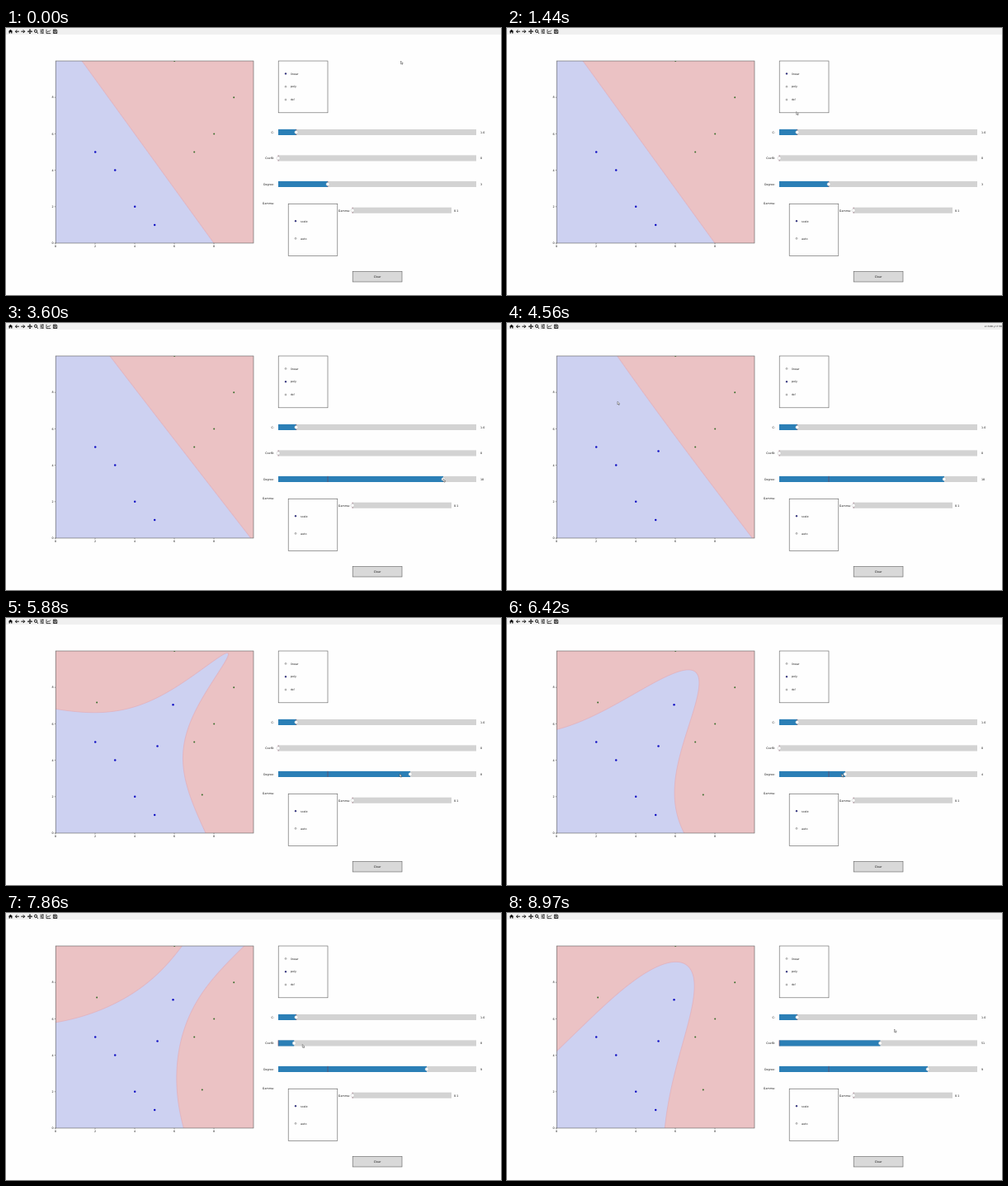
An HTML page with a canvas that plays this animation: 600x324 px, repeating every 9 s.

```html
<!DOCTYPE html>
<html lang="en">
<head>
<meta charset="utf-8">
<title>SVM kernel explorer</title>
<style>
  html, body { margin: 0; width: 100%; height: 100%; overflow: hidden; background: #fefefe; }
  canvas, svg { position: absolute; left: 0; top: 0; }
  canvas { left: 60px; top: 40px; }
  text { font: 3.3px "DejaVu Sans", sans-serif; fill: #111; text-rendering: geometricPrecision; }
  .end { text-anchor: end; }
  .mid { text-anchor: middle; }
  .frame { fill: none; stroke: #5c5c5c; stroke-width: .6; }
  .icon { fill: none; stroke: #111; stroke-width: 1; }
  .fine { stroke-width: .75; }
  .solid { fill: #111; stroke: none; }
</style>
</head>
<body>
<canvas id="plot" width="240" height="221"></canvas>
<svg id="ui" width="600" height="324" viewBox="0 0 600 324">
  <rect width="600" height="8" fill="#f0f0f0"/>
  <g class="icon">
    <path class="solid" d="M2.8 4.3 5.5 1.7 8.2 4.3H7.4V6.6H6.1V4.9H4.9V6.6H3.6V4.3Z"/>
    <path d="M15.8 4.2H11.5M13.3 2.3 11.4 4.2 13.3 6.1"/>
    <path d="M18.3 4.2H22.6M20.8 2.3 22.7 4.2 20.8 6.1"/>
    <path d="M26.7 4.2H31.3M29 1.9V6.5"/>
    <path class="solid" d="M29 1.2 30.2 2.5H27.8ZM29 7.2 30.2 5.9H27.8ZM26 4.2 27.3 3V5.4ZM32 4.2 30.7 3V5.4Z"/>
    <circle cx="36" cy="3.7" r="1.6"/><path d="M37.2 4.9 39 6.7"/>
    <path class="fine" d="M41.5 2.3H46M41.5 4.2H46M41.5 6.1H46M44.5 1.6V3M42.7 3.5V4.9M44.2 5.4V6.8"/>
    <path class="fine" d="M49 1.7V6.6H54.2M49.8 5.2 51.2 3.8 52.2 4.6 53.9 2.5"/>
    <path class="fine" d="M57.4 2H61L61.8 2.8V6.5H57.4ZM58.4 2V3.5H60.4V2M58.4 6.5V4.8H60.8V6.5"/>
  </g>
  <text id="coords" class="end" x="600" y="5.3" style="font-size:2.8px"></text>
  <clipPath id="axes"><rect x="60" y="40" width="240" height="221"/></clipPath>
  <g id="dots" clip-path="url(#axes)"></g>
  <rect class="frame" x="60.2" y="40" width="239.8" height="221"/>
  <g id="panel"></g>
  <path id="cursor" d="M0 0V3.7L.9 2.9 1.5 4.3 2.2 4 1.6 2.7H2.7Z" fill="#fff" stroke="#222" stroke-width=".4"/>
</svg>
<script>
const LOOP = 9000;
const DRAG_LAG = 60, CLICK_LAG = 160;
const $ = id => document.getElementById(id);
const plot = $('plot'), ctx = plot.getContext('2d');
const W = plot.width, H = plot.height, LEFT = 60, BOTTOM = 261;
const UNIT_X = W / 10, UNIT_Y = H / 10;
const BLUE = -1, GREEN = 1;

const toScreen = (x, y) => [LEFT + x * UNIT_X, BOTTOM - y * UNIT_Y];
const toData = (x, y) => [(x - LEFT) / UNIT_X, (BOTTOM - y) / UNIT_Y];

const SLIDERS = {
  c: { label: 'C:', x: 330, y: 126.5, width: 240, max: 11, initial: 1, gap: 5 },
  coef: { label: 'Coef0:', x: 330, y: 158, width: 240, max: 100, initial: 0, gap: 5 },
  degree: { label: 'Degree:', x: 330, y: 189.5, width: 240, max: 12, initial: 3, gap: 5 },
  gamma: { label: 'Gamma:', x: 420, y: 221.3, width: 120, max: 1, initial: 0, gap: 3 },
};
const knobX = (name, value) => SLIDERS[name].x + value / SLIDERS[name].max * SLIDERS[name].width;
const knob = (name, value) => [knobX(name, value), SLIDERS[name].y - .5];

// The session as pointer moves; everything else follows from them
const REST = [478.5, 40];
const move = (start, end, to, action = {}) => ({ start, end, to, ...action });
const MOVES = [
  move(60, 300, [527, 175]),
  move(300, 480, [465, 299]),
  move(480, 660, [154, 288]),
  move(660, 930, [376, 171]),
  move(1020, 1680, [340, 72], { pick: 'poly' }),
  move(1880, 2850, knob('degree', 3.12)),
  move(2880, 3420, knob('degree', 10), { drag: 'degree' }),
  move(3600, 4200, toScreen(5.14, 4.77), { add: BLUE }),
  move(4320, 4560, toScreen(3.08, 7.5)),
  move(4560, 4690, toScreen(2.08, 7.17), { add: GREEN }),
  move(4770, 4960, toScreen(5.93, 7.05), { add: BLUE }),
  move(5040, 5200, toScreen(7.4, 2.1), { add: GREEN }),
  move(5490, 5640, knob('degree', 9.95)),
  move(5640, 6180, knob('degree', 3.78), { drag: 'degree' }),
  move(6560, 7150, knob('degree', 9), { drag: 'degree' }),
  move(7320, 7600, [330, 160]),
  move(7600, 8420, [knobX('coef', 51), 158], { drag: 'coef' }),
  move(8600, 8970, [469.5, 141]),
];

const sample = (x, y, side, at = 0) => ({ x, y, side, at });
const SAMPLES = [
  ...[[2, 5], [3, 4], [4, 2], [5, 1]].map(p => sample(...p, BLUE)),
  ...[[9, 8], [8, 6], [7, 5], [6, 10]].map(p => sample(...p, GREEN)),
  ...MOVES.filter(m => m.add).map(m => sample(...toData(...m.to), m.add, m.end + CLICK_LAG)),
];
const POLY_AT = MOVES.find(m => m.pick).end + CLICK_LAG;

function pointerAt(t) {
  const n = MOVES.findLastIndex(m => m.start <= t);
  if (n < 0) return REST;
  const { start, end, to } = MOVES[n], from = n ? MOVES[n - 1].to : REST;
  const u = Math.min(1, (t - start) / (end - start)), e = u * u * (3 - 2 * u);
  return from.map((v, axis) => v + (to[axis] - v) * e);
}

function sliderAt(name, t) {
  const seen = t - DRAG_LAG, { x, width, max, initial } = SLIDERS[name];
  const drag = MOVES.findLast(m => m.drag === name && m.start <= seen);
  return drag ? Math.round((pointerAt(Math.min(seen, drag.end))[0] - x) / width * max) : initial;
}

const END = 'class="end"', MID = 'class="mid"';
const text = (x, y, label, extra = '') => `<text x="${x}" y="${y + 1.2}" ${extra}>${label}</text>`;
const frame = (x, y, w, h, fill = 'none') =>
  `<rect class="frame" x="${x}" y="${y}" width="${w}" height="${h}" style="fill:${fill}"/>`;
const radio = (id, x, y) =>
  `<circle id="${id}" cx="${x}" cy="${y}" r=".95" stroke="#333" stroke-width=".4"/>` + text(x + 6, y, id);

function slider(name) {
  const { label, x, y, width, initial, gap } = SLIDERS[name];
  const box = `x="${x}" y="${y - 3.6}" height="7.1"`;
  return text(x - gap, y, label, END) +
    `<rect ${box} width="${width}" fill="#d3d3d3"/>
     <rect ${box} id="${name}Bar" fill="#2b7fb6"/>
     <path d="M${knobX(name, initial)} ${y - 3.6}v7.1" stroke="#7a3d55" stroke-width=".6"/>
     <circle id="${name}Knob" cy="${y}" r="2" fill="#fff" stroke="#bbb" stroke-width=".4"/>` +
    text(x + width + gap, y, '', `id="${name}Value"`);
}

function buildPanel() {
  let out = '';
  for (let v = 0; v < 10; v += 2) {
    const [x, y] = toScreen(v, v);
    out += `<path d="M${x} ${BOTTOM}v1.2M${LEFT} ${y}h-1.2" stroke="#333" stroke-width=".5"/>` +
      text(x, 265.2, v, MID) + text(57.5, y, v, END);
  }
  out += frame(330.2, 40, 59.8, 62.8) + frame(342.2, 213.4, 59.6, 63) + frame(420.2, 295.6, 59.8, 12.4, '#d9d9d9');
  ['linear', 'poly', 'rbf'].forEach((id, i) => { out += radio(id, 339, 55.4 + i * 15.8); });
  ['scale', 'auto'].forEach((id, i) => { out += radio(id, 351, 234.3 + i * 21.1); });
  out += Object.keys(SLIDERS).map(slider).join('') + text(325, 213, 'Gamma:', END) + text(450, 301.8, 'Clear', MID);
  $('panel').innerHTML = out;
  $('dots').innerHTML = SAMPLES.map(({ x, y, side }) => {
    const [cx, cy] = toScreen(x, y);
    return `<circle cx="${cx + .2}" cy="${cy}" r="${side === BLUE ? 1.25 : 1}" fill="${side === BLUE ? '#1414c4' : '#3a6e2c'}"/>`;
  }).join('');
}

function setSlider(name, value, label = value) {
  const x = knobX(name, value);
  $(name + 'Bar').setAttribute('width', x - SLIDERS[name].x);
  $(name + 'Knob').setAttribute('cx', x);
  $(name + 'Value').textContent = label;
}

const setRadio = (id, on) => $(id).setAttribute('fill', on ? '#1010a8' : '#fff');

function makeKernel(points, linear, degree, coef) {
  if (linear) return (a, b) => a.x * b.x + a.y * b.y;
  const all = points.flatMap(p => [p.x, p.y]);
  const mean = all.reduce((s, v) => s + v, 0) / all.length;
  const variance = all.reduce((s, v) => s + (v - mean) ** 2, 0) / all.length;
  const gamma = 1 / (2 * variance);
  return (a, b) => (gamma * (a.x * b.x + a.y * b.y) + coef) ** degree;
}

// Sequential minimal optimisation with C = 1 and second-order pair selection
function train(points, kernel) {
  const n = points.length;
  const K = points.map(p => points.map(q => kernel(p, q)));
  const beta = new Float64Array(n), F = Float64Array.from(points, p => p.side);
  const high = points.map(p => p.side > 0 ? 1 : 0), low = high.map(h => h - 1);
  const curve = (i, j) => Math.max(K[i][i] + K[j][j] - 2 * K[i][j], 1e-12);
  let bias = 0;
  for (let step = 0; step < 200000; step++) {
    let i = -1, j = -1, best = 0, min = Infinity;
    for (let k = 0; k < n; k++) if (beta[k] < high[k] && (i < 0 || F[k] > F[i])) i = k;
    for (let k = 0; k < n; k++) {
      if (beta[k] <= low[k]) continue;
      min = Math.min(min, F[k]);
      const gap = F[i] - F[k], gain = gap * gap / curve(i, k);
      if (gap > 0 && gain > best) { best = gain; j = k; }
    }
    bias = (F[i] + min) / 2;
    if (j < 0 || F[i] - min < 1e-3) break;
    const shift = Math.min((F[i] - F[j]) / curve(i, j), high[i] - beta[i], beta[j] - low[j]);
    beta[i] += shift;
    beta[j] -= shift;
    for (let k = 0; k < n; k++) F[k] -= shift * (K[i][k] - K[j][k]);
  }
  const support = points.map((p, k) => ({ ...p, weight: beta[k] })).filter(s => s.weight !== 0);
  return at => support.reduce((sum, s) => sum + s.weight * kernel(at, s), bias);
}

const BLUE_AREA = [205, 209, 241], RED_AREA = [235, 194, 196], EDGE = [226, 166, 178];
const mix = (a, b, u) => a + (b - a) * u;

function paintRegions(decide) {
  const image = ctx.createImageData(W, H), cols = W + 1;
  const f = new Float64Array(cols * (H + 1));
  for (let y = 0; y <= H; y++)
    for (let x = 0; x <= W; x++)
      f[y * cols + x] = decide({ x: (x + .5) / UNIT_X, y: (H - y - .5) / UNIT_Y });
  for (let y = 0; y < H; y++) {
    for (let x = 0; x < W; x++) {
      const k = y * cols + x, v = f[k];
      const dist = v / (Math.hypot(f[k + 1] - v, f[k + cols] - v) || 1e-300);
      const red = Math.min(1, Math.max(0, dist + .5));
      const edge = .55 * Math.max(0, 1 - Math.abs(dist));
      const color = BLUE_AREA.map((c, i) => mix(mix(c, RED_AREA[i], red), EDGE[i], edge));
      image.data.set([...color, 255], (y * W + x) * 4);
    }
  }
  return image;
}

const cache = new Map();
let shown = '';

function drawRegions(points, linear, degree, coef) {
  const key = [linear, points.length, degree, coef].join();
  if (key === shown) return;
  if (!cache.has(key))
    cache.set(key, paintRegions(train(points, makeKernel(points, linear, degree, coef))));
  ctx.putImageData(cache.get(key), 0, 0);
  shown = key;
}

function render(t) {
  const linear = t < POLY_AT, degree = sliderAt('degree', t), coef = sliderAt('coef', t);
  drawRegions(SAMPLES.filter(s => t >= s.at), linear, degree, coef);
  SAMPLES.forEach((s, i) => { $('dots').children[i].style.display = t >= s.at ? '' : 'none'; });
  setRadio('linear', linear);
  setRadio('poly', !linear);
  setSlider('coef', coef);
  setSlider('degree', degree);

  const [x, y] = pointerAt(t), [dataX, dataY] = toData(x, y);
  $('cursor').setAttribute('transform', `translate(${x} ${y})`);
  const inside = Math.min(dataX, dataY) > 0 && Math.max(dataX, dataY) < 10;
  $('coords').textContent = inside ? `x=${dataX.toFixed(2)} y=${dataY.toFixed(2)}` : '';
}

buildPanel();
setSlider('c', 1, '1.0');
setSlider('gamma', 0, '0.1');
setRadio('rbf', false);
setRadio('scale', true);
setRadio('auto', false);

const start = performance.now();
(function tick() {
  render((performance.now() - start) % LOOP);
  requestAnimationFrame(tick);
})();
</script>
</body>
</html>
```
